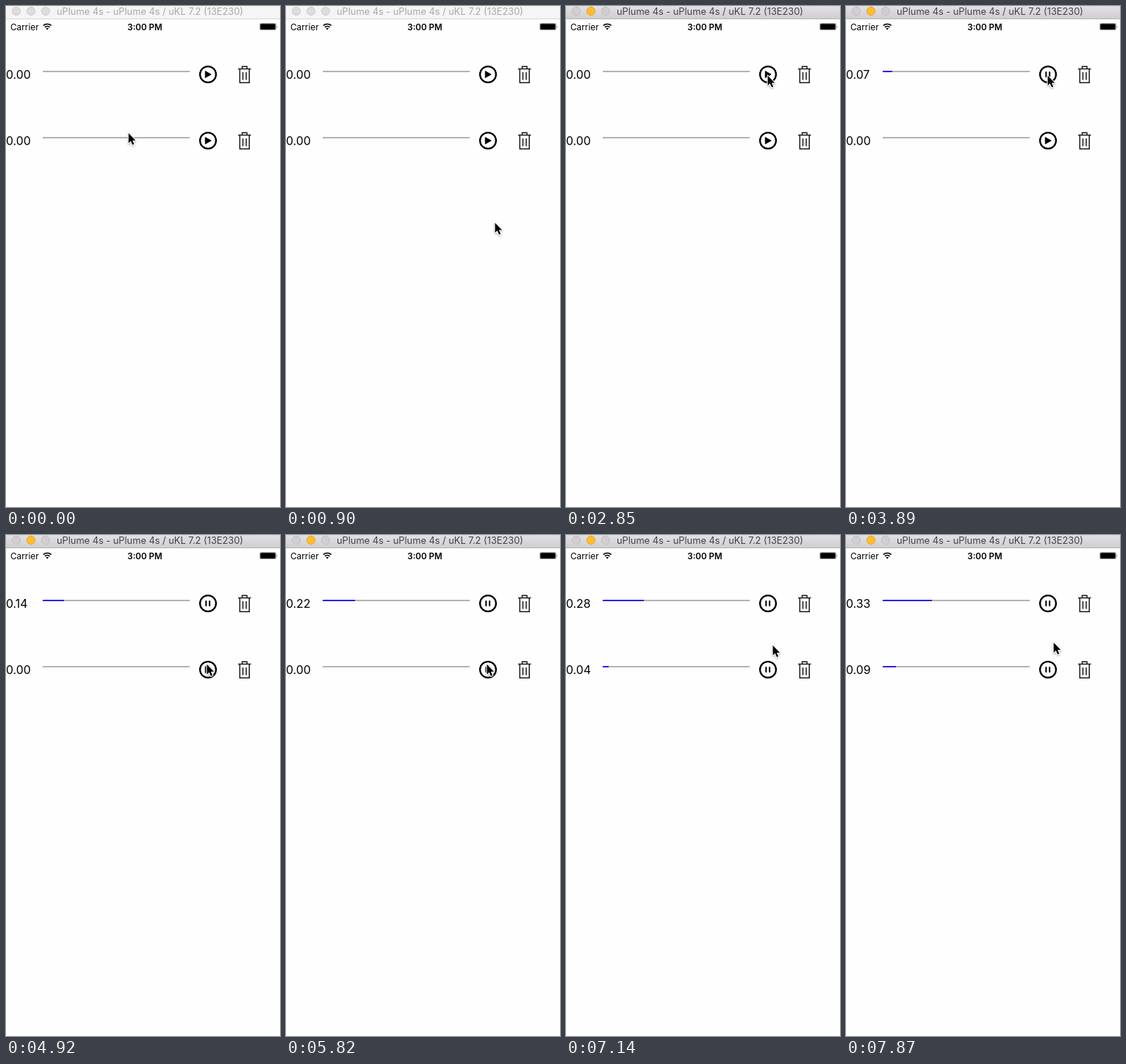
These frames come from a looping animation (373 by 681 pixels, 8 s). An HTML page:

```html
<!DOCTYPE html>
<html lang="en">
<head>
<meta charset="utf-8">
<title>Download rows</title>
<style>
  html, body { margin: 0; width: 100%; height: 100%; overflow: hidden; background: #fefefe; }
  svg { display: block; width: 373px; height: 681px; }
  text { font-family: Inter, "Open Sans", sans-serif; }
  .value { font-size: 15.8px; }
  .title { font-size: 12.8px; fill: #a9a9a9; }
  .dot { fill: #dcdcdc; stroke: #cfcfcf; }
  .bar { fill: #f5f5f5; }
  .edge { fill: #d6d6d6; }
  .active .bar { fill: url(#chrome); }
  .active .edge { fill: #b4b2b4; }
  .active .title { fill: #454345; }
  .active .dot { fill: #d0ced0; stroke: #c0bec0; }
  .active .mid { fill: #fdbd30; stroke: #e6a52b; }
  .trash { fill: none; stroke: #1c1c1c; stroke-width: 1.5; }
</style>
</head>
<body>
<svg viewBox="0 0 373 681">
  <defs>
    <linearGradient id="chrome" x2="0" y2="1">
      <stop stop-color="#e2e0e2"/><stop offset="1" stop-color="#d0ced0"/>
    </linearGradient>
    <filter id="shadow" x="-50%" y="-50%" width="200%" height="200%">
      <feDropShadow dx="0" dy="1" stdDeviation="1" flood-opacity=".4"/>
    </filter>
  </defs>
  <rect width="373" height="681" fill="#fefefe"/>

  <g id="window">
    <rect class="bar" width="373" height="17"/>
    <rect class="edge" y="17" width="373" height="1"/>
    <circle class="dot" cx="14" cy="7" r="5.6"/>
    <circle class="dot mid" cx="34" cy="7" r="5.6"/>
    <circle class="dot" cx="54" cy="7" r="5.6"/>
    <text class="title" x="69" y="12">uPlume 4s - uPlume 4s / uKL 7.2 (13E230)</text>
  </g>

  <text x="6" y="32.5" font-size="11.8">Carrier</text>
  <text x="189" y="32.5" font-size="11.6" font-weight="600" text-anchor="middle">3:00 PM</text>
  <g fill="none" stroke="#000" stroke-width="1.6">
    <path d="M50.8 26.7A7.8 7.8 0 0 1 61.6 26.7M52.9 28.9A4.8 4.8 0 0 1 59.5 28.9"/>
    <path d="M56.2 32.6L54.4 30.6A2.6 2.6 0 0 1 58 30.6Z" fill="#000" stroke="none"/>
  </g>
  <rect x="345.4" y="23.5" width="22.4" height="9.2" rx="2" fill="none" stroke="#777" stroke-width=".6"/>
  <rect x="346.2" y="24.3" width="20.6" height="7.6" rx="1.2"/>
  <path d="M368.6 26.4Q370 28.2 368.6 30Z"/>

  <g id="rows"></g>

  <g id="cursor" filter="url(#shadow)">
    <path d="M0 0V13.6L3.1 10.7L5.4 16L7.6 15L5.3 9.9H9.6Z" stroke="#fff" stroke-width="2" stroke-linejoin="round" paint-order="stroke"/>
  </g>
</svg>
<script>
const LOOP = 8000;
const PLAY = "M271.3 88.6V97.4L279.2 93Z";
const PAUSE = "M271.9 89.6H272.9V96.4H271.9ZM276.7 89.6H277.7V96.4H276.7Z";
const byId = id => document.getElementById(id);
const clamp = u => Math.min(1, Math.max(0, u));
const easeOut = u => 1 - (1 - u) ** 3;

// Download progress as [tick, share], linear in between.
const rows = [
  { y: 0, play: 20, keys: [[20.2, 0], [33, .1449], [39, .219], [48, .28], [53, .3349]] },
  { y: 90, play: 35, keys: [[44, 0], [53, .091]] }
];

// Stops the pointer glides to after its first sweep.
const glides = [
  { from: 7, to: 12, x: 274.6, y: 94.6 },
  { from: 28, to: 33, x: 273.5, y: 175.8 },
  { from: 43, to: 53, x: 282.7, y: 146.3 }
];

const progress = (keys, n) => keys.slice(1).reduce((p, [to, end], i) => {
  const [from, start] = keys[i];
  return p + (end - start) * clamp((n - from) / (to - from));
}, 0);

// One swing down and back up, then the glides.
function pointer(n) {
  const u = clamp(n / 7);
  let x = 166.8 + 119 * Math.sin(2 * u);
  let y = 172.8 - 34 * u + 348 * Math.sin(Math.PI * u);
  for (const g of glides) {
    const k = easeOut(clamp((n - g.from) / (g.to - g.from)));
    x += (g.x - x) * k;
    y += (g.y - y) * k;
  }
  return [x, y];
}

byId("rows").innerHTML = rows.map(r => `
  <g transform="translate(0 ${r.y})">
    <text class="value" y="99">0.00</text>
    <rect x="50" y="88" width="200" height="2" fill="#b4b4b4"/>
    <rect class="fill" x="50" y="88" width="0" height="2" fill="#3020f0"/>
    <circle cx="275" cy="93" r="10.9" fill="none" stroke="#000" stroke-width="2.3"/>
    <path class="icon" stroke="#000" stroke-linejoin="round"/>
    <path class="trash" d="M316 85.5H333.5M321.5 85V82.2H328V85M318.3 86V104.2H331.2V86M322.5 90V100.5M327 90V100.5"/>
  </g>`).join("");

rows.forEach((r, i) => {
  const g = byId("rows").children[i];
  r.text = g.querySelector("text");
  r.fill = g.querySelector(".fill");
  r.icon = g.querySelector(".icon");
});

// The screen refreshes every 150 ms, slightly faster from 3.3 s on.
const tickAt = t => t < 3300 ? Math.floor(t / 150) : 22 + Math.floor((t - 3294) / 147.4);

function draw(t) {
  const n = tickAt(t);
  byId("window").classList.toggle("active", n >= 19);
  for (const r of rows) {
    const p = progress(r.keys, n);
    r.text.textContent = p.toFixed(2);
    r.fill.setAttribute("width", Math.round(p * 200));
    r.icon.setAttribute("d", n >= r.play ? PAUSE : PLAY);
  }
  byId("cursor").setAttribute("transform", `translate(${pointer(n)})`);
}

const begin = performance.now();
function loop() {
  draw((performance.now() - begin) % LOOP);
  requestAnimationFrame(loop);
}
loop();
</script>
</body>
</html>
```
